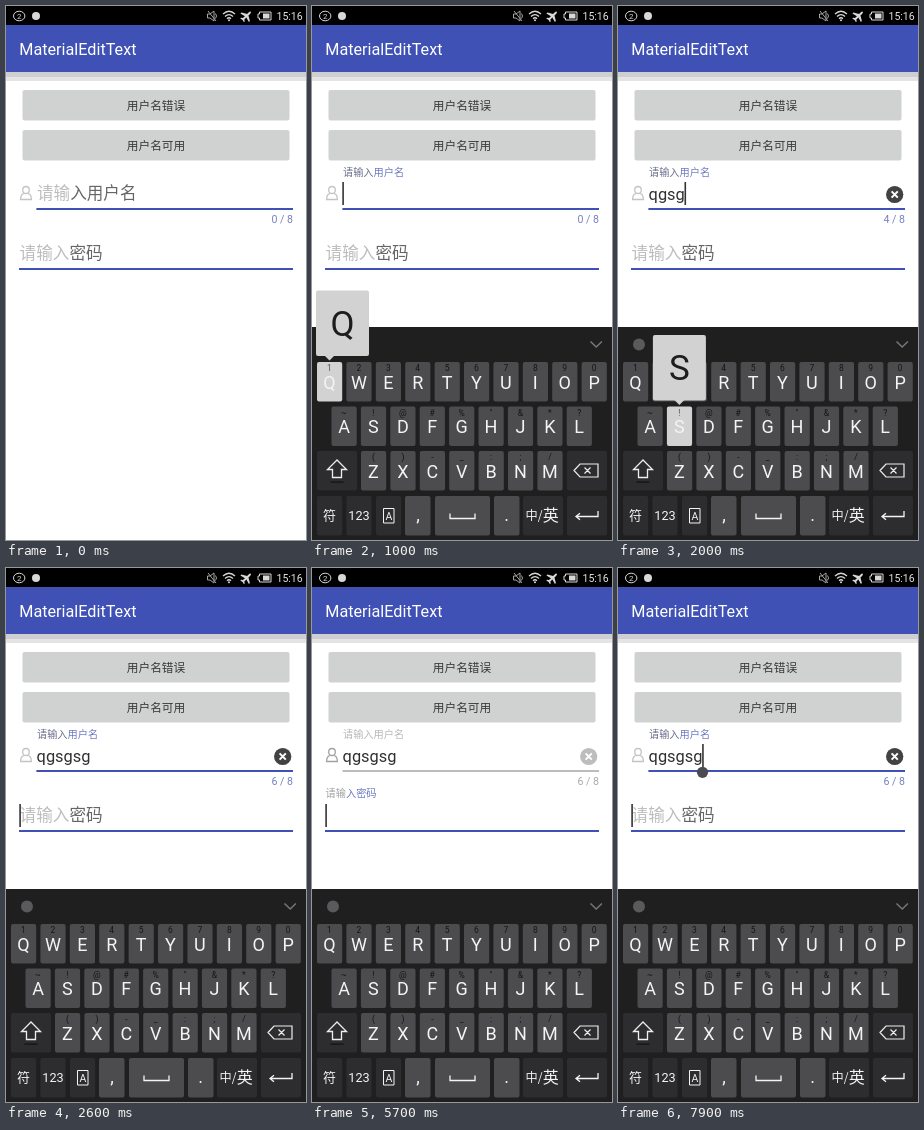
An HTML page with a canvas that plays this animation: 300 by 534 pixels, repeating every 8000 ms.

```html
<!DOCTYPE html>
<html lang="zh-CN">
<head>
<meta charset="utf-8">
<title>MaterialEditText</title>
<style>
html, body { margin: 0; width: 100%; height: 100%; overflow: hidden; background: #fff; }
canvas { display: block; width: 100vw; height: 100vh; }
</style>
</head>
<body>
<canvas id="stage"></canvas>
<script>
const W = 300, H = 534, LOOP = 8000;
const LATIN = 'Roboto, sans-serif';
const CJK = '"Noto Sans CJK SC", "Noto Sans CJK", sans-serif';
const BLUE = '#3f51b5', INK = '#303030', PALE = '#bdbdbd', HINT = '#666';
const canvas = document.getElementById('stage');
const ctx = canvas.getContext('2d');

// letter, time down, time up
const PRESSES = [
  ['Q', 1000, 1150], ['G', 1250, 1450], ['S', 1500, 1700],
  ['G', 1700, 1850], ['S', 1900, 2050], ['G', 2100, 2200]
];
const ROWS = [
  { y: 356, x: 17.5, keys: 'QWERTYUIOP', hints: '1234567890' },
  { y: 400.5, x: 32, keys: 'ASDFGHJKL', hints: '~!@#%"&*?' },
  { y: 445, x: 61.5, keys: 'ZXCVBNM', hints: '()-_:;/' }
];
const PITCH = 29.4;

const ramp = (t, a, b) => Math.min(1, Math.max(0, (t - a) / (b - a)));
const ease = p => p * p * (3 - 2 * p);
const within = (t, a, b) => t >= a && t < b;

function rect(x, y, w, h, color, r = 0) {
  ctx.fillStyle = color;
  ctx.beginPath();
  ctx.roundRect(x, y, w, h, r);
  ctx.fill();
}

function disc(x, y, r, color) {
  ctx.fillStyle = color;
  ctx.beginPath();
  ctx.arc(x, y, r, 0, Math.PI * 2);
  ctx.fill();
}

function stroke(d, color, width = 1) {
  ctx.strokeStyle = color;
  ctx.lineWidth = width;
  ctx.stroke(new Path2D(d));
}

function text(str, x, y, size, color, { font = LATIN, align = 'left', weight = 400 } = {}) {
  ctx.font = `${weight} ${size}px ${font}`;
  ctx.textAlign = align;
  ctx.fillStyle = color;
  ctx.fillText(str, x, y);
  return ctx.measureText(str).width;
}

function withAlpha(alpha, draw) {
  if (alpha <= 0) return;
  ctx.save();
  ctx.globalAlpha *= alpha;
  draw();
  ctx.restore();
}

// first `split` characters in one colour, the rest in another
function twoTone(str, split, x, y, size, first, rest, weight = 400) {
  const opt = { font: CJK, weight };
  const w = text(str.slice(0, split), x, y, size, first, opt);
  text(str.slice(split), x + w, y, size, rest, opt);
}

function statusBar() {
  rect(0, 0, W, 19, '#000');
  const c = '#d8d8d8';
  stroke('M7.5 10a5.7 4.8 0 1 0 11.4 0a5.7 4.8 0 1 0-11.4 0', c);
  text('2', 13.2, 13, 8, c, { align: 'center' });
  disc(30, 10, 4, c);
  stroke('M201.5 8h2.5l4-3v10l-4-3h-2.5zM209.5 7.5q2 2.5 0 5M202 5l8 10', '#a5a5a5');
  stroke('M217 8q6-5.4 12 0M219 10.4q4-3.6 8 0M221 12.7q2-1.8 4 0', c, 1.3);
  disc(223, 14.3, 1, c);
  ctx.save();
  ctx.translate(240.5, 10);
  ctx.rotate(Math.PI / 4);
  ctx.fillStyle = c;
  ctx.fill(new Path2D('M0-6q1 0 1 2v2.2l5 3v1.4l-5-1.4v2.8l1.6 1.2v1l-2.6-.7-2.6.7v-1l1.6-1.2V1.2l-5 1.4V1.2l5-3V-4q0-2 1-2z'));
  ctx.restore();
  stroke('M253.5 6h11.5v8h-11.5v-2h-1.5v-4h1.5z', c);
  rect(257, 7.5, 6.5, 5, c);
  text('15:16', 270.5, 14, 10.5, '#e4e4e4');
}

function header() {
  rect(0, 19, W, 47, BLUE);
  text('MaterialEditText', 13.3, 49, 16.2, '#fff');
  rect(0, 66, W, 5, '#cfcfd2');
  rect(0, 71, W, 4, '#e4e4e4');
  [['用户名错误', 84], ['用户名可用', 124]].forEach(([label, y]) => {
    rect(16.5, y, 267, 30.5, '#d0d1d1', 2);
    text(label, 150, y + 19.5, 11.7, '#383838', { font: CJK, align: 'center' });
  });
}

function caret(x, y) {
  rect(x - 0.7, y, 1.6, 23, '#333');
}

function clearIcon(focus) {
  disc(276.7, 188.5, 8.6, PALE);
  withAlpha(focus, () => disc(276.7, 188.5, 8.6, '#424242'));
  stroke('M273.6 185.4l6.2 6.2m0-6.2l-6.2 6.2', '#fff', 2);
}

function nameField(t, focus) {
  const typed = PRESSES.filter(p => t >= p[2]).map(p => p[0].toLowerCase()).join('');
  const raise = ease(ramp(t, 700, 1000));
  const iconColor = focus > 0.5 ? '#c4c4c4' : '#a2a2a2';
  stroke('M16.7 184a3.3 3.5 0 1 0 6.6 0a3.3 3.5 0 1 0-6.6 0M18 187.3q-3.4 1-3.4 6.2h10.8q0-5.2-3.4-6.2', iconColor, 1.3);

  withAlpha(1 - raise, () => twoTone('请输入用户名', 2, 31, 193, 16.6, PALE, HINT, 300));
  const labelY = 169.7 + 6 * (1 - raise);
  withAlpha(raise * (1 - focus), () => text('请输入用户名', 31, labelY, 10.2, '#b8b8b8', { font: CJK }));
  withAlpha(raise * focus, () => twoTone('请输入用户名', 3, 31, labelY, 10.2, '#6b6f8c', '#6c78c0'));

  const width = text(typed, 30.6, 194, 16.4, INK);
  if (typed) clearIcon(focus);

  rect(30.5, 202, 256.5, 2, '#bcbcbc');
  withAlpha(focus, () => rect(30.5, 202, 256.5, 2, BLUE));

  const counter = `${typed.length} / 8`;
  const tint = t < 500 ? 1 : t < 2600 ? raise : focus;
  const opt = { align: 'right' };
  withAlpha(1 - tint, () => text(counter, 287, 217, 10.6, '#a9a9a9', opt));
  withAlpha(tint, () => text(counter, 287, 217, 10.6, '#7580c0', opt));

  if (within(t, 500, 2600) || within(t, 6900, 7400) || t >= 7900) {
    caret(Math.max(31, 30.6 + width + 0.4), 176);
  }
  if (t >= 6900) disc(84.5, 204.3, 5.6, '#4b4b50');
}

function passField(t, raise) {
  withAlpha(1 - raise, () => twoTone('请输入密码', 3, 13.6, 253, 16.6, PALE, HINT, 300));
  withAlpha(raise, () => twoTone('请输入密码', 2, 13.6, 229 + 6 * (1 - raise), 10.2, '#a0a0a4', '#6c78c0'));
  rect(13, 262, 274, 2, BLUE);
  const blinkOn = Math.floor((t - 2700) / 500) % 2 === 0;
  if (within(t, 2600, 2700) || within(t, 2700, 6700) && blinkOn || t >= 6700) caret(14, 236);
}

function funcKey(x, y, w) {
  rect(x, y, w, 39.5, '#2d2d2f', 2);
}

function letterKey(row, i, active) {
  const x = row.x + i * PITCH;
  rect(x - 12.5, row.y, 25.2, 39.5, active ? '#d2d2d2' : '#4c4c4f', 2);
  text(row.hints[i], x, row.y + 9, 8.5, active ? '#555' : '#151515', { align: 'center' });
  text(row.keys[i], x, row.y + 26.5, 18, '#f4f4f4', { align: 'center' });
}

function keyPopup(row, i) {
  const x = row.x + i * PITCH;
  const left = Math.min(W - 57, Math.max(4, x - 26.5));
  const top = row.y - 71.5;
  rect(left, top, 53, 65.5, '#d2d2d2', 2);
  ctx.fill(new Path2D(`M${x - 5} ${top + 65}h10l-5 5z`));
  text(row.keys[i], left + 26.5, top + 45, 35, '#1d1d1d', { align: 'center' });
}

function bottomRow() {
  const y = 490, c = '#f4f4f4', mid = { align: 'center' };
  [[5, 25.2], [34.4, 25.2], [64, 25.2], [211, 40], [255, 40]].forEach(([x, w]) => funcKey(x, y, w));
  [[93, 25.5], [123, 55], [182, 25.5]].forEach(([x, w]) => rect(x, y, w, 39.5, '#4c4c4f', 2));
  text('符', 17.5, 514, 13, c, { font: CJK, align: 'center' });
  text('123', 47, 514, 12.7, c, mid);
  stroke('M71.5 502.5h10.5v14.5h-10.5z', c);
  text('A', 76.8, 514, 10.5, c, mid);
  text(',', 106, 515, 18, c, mid);
  text('.', 194.5, 515, 18, c, mid);
  stroke('M138 507.5v5h25v-5', c, 1.3);
  text('中/', 222, 514, 12.2, c, { font: CJK, align: 'center' });
  text('英', 238.8, 515, 16, c, { font: CJK, align: 'center' });
  stroke('M286 505v5.5h-22m4-3.2l-4 3.2l4 3.2', c, 1.3);
}

function keyboard(t) {
  if (t < 500) return;
  const offset = Math.round(214 * (1 - ramp(t, 450, 895)) ** 2);
  const press = PRESSES.find(p => within(t, p[1], p[2]));
  const active = press && press[0];
  ctx.save();
  ctx.translate(0, offset);
  rect(0, 321, W, 214, '#1f1f20');
  disc(21, 338.5, 6, '#5a5a5c');
  stroke('M278.5 335.5l5.7 5.5l5.7-5.5', '#777', 1.5);
  ROWS.forEach(row => [...row.keys].forEach((k, i) => letterKey(row, i, k === active)));
  funcKey(5, 445, 40);
  funcKey(255, 445, 40);
  stroke('M25 454l-9.5 9.5h5v8h9v-8h5z', '#eee', 1.3);
  rect(18.5, 475.5, 13, 1.2, '#111');
  stroke('M262 464.5l6-6.5h18v13h-18zM272.5 461.5l6 6m0-6l-6 6', '#eee', 1.2);
  bottomRow();
  if (active) {
    const row = ROWS.find(r => r.keys.includes(active));
    keyPopup(row, row.keys.indexOf(active));
  }
  ctx.restore();
}

function draw(t) {
  const ratio = window.devicePixelRatio || 1;
  const w = Math.round(innerWidth * ratio), h = Math.round(innerHeight * ratio);
  if (canvas.width !== w || canvas.height !== h) {
    canvas.width = w;
    canvas.height = h;
  }
  ctx.setTransform(w / W, 0, 0, h / H, 0, 0);
  rect(0, 0, W, H, '#fff');
  const away = ease(ramp(t, 2600, 3000)) - ease(ramp(t, 6900, 7300));
  statusBar();
  header();
  nameField(t, 1 - away);
  passField(t, away);
  keyboard(t);
}

const start = performance.now();
function tick() {
  draw((performance.now() - start) % LOOP);
  requestAnimationFrame(tick);
}
tick();
</script>
</body>
</html>
```
